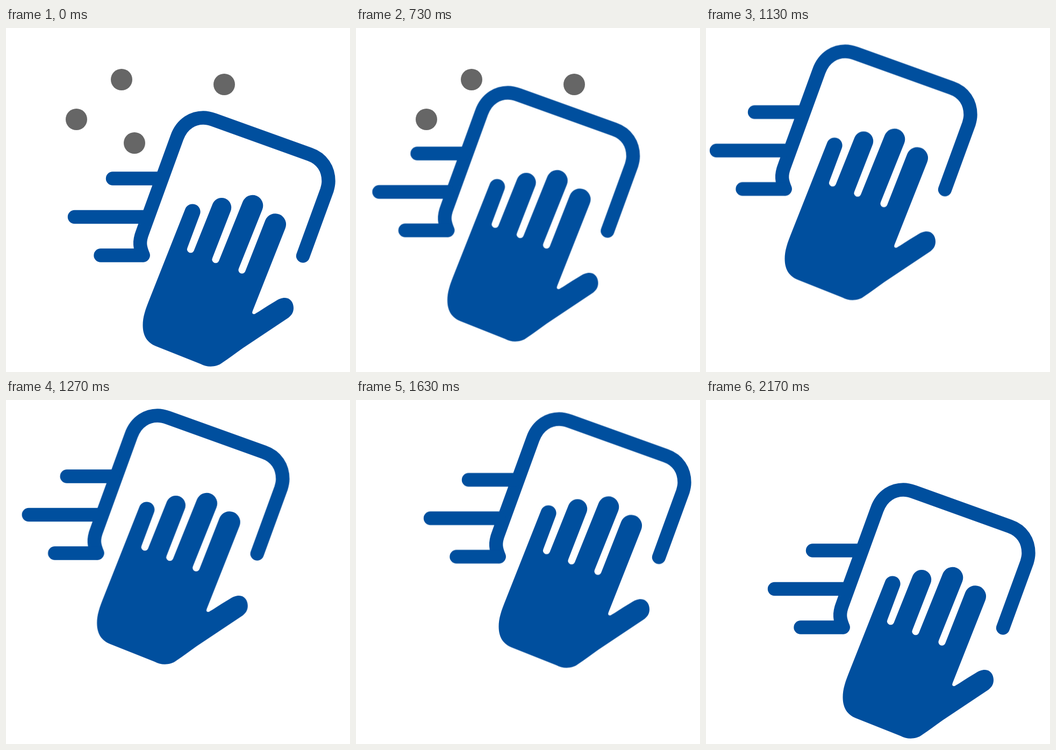
Recreate the animation shown at these times as an HTML page without scripts. Size 640 by 640 pixels, loop 3.61 s.

```html
<!DOCTYPE html>
<html lang="en">
<head>
<meta charset="utf-8">
<title>Wiping hand</title>
<style>
  html, body { margin: 0; width: 100%; height: 100%; overflow: hidden; background: #fff; }
  svg { display: block; width: 100%; height: 100%; }

  .dots { fill: #666; animation: vanish 3610ms step-end infinite; }
  .wiper { animation: wipe 3610ms steps(2, start) infinite; }
  .cloth { fill: #fff; stroke: #004f9e; stroke-width: 25.4; stroke-linecap: round; stroke-linejoin: round; }
  .hand { fill: #004f9e; }

  @keyframes vanish {
    0% { visibility: visible; }
    25.761%, 100% { visibility: hidden; }
  }

  /* One round of the wipe, advancing in steps of about 40 ms */
  @keyframes wipe {
    0% { transform: none; animation-timing-function: step-end; }
    11.911% { transform: translate(0, 0); animation-timing-function: steps(8, start); }
    21.329% { transform: translate(-84.5px, -46.5px); }
    23.545% { transform: translate(-100px, -60px); }
    25.761% { transform: translate(-109.5px, -75.5px); }
    27.977% { transform: translate(-113.5px, -92.5px); }
    30.193% { transform: translate(-113.5px, -109px); }
    32.409% { transform: translate(-108px, -123.5px); }
    34.349% { transform: translate(-95px, -134.5px); }
    36.565% { transform: translate(-75.5px, -141.5px); }
    38.504% { transform: translate(-52px, -144.2px); }
    40.72% { transform: translate(-28px, -144.6px); animation-timing-function: steps(1, start); }
    42.382% { transform: translate(-16px, -144.8px); animation-timing-function: steps(1, start); }
    43.49% { transform: translate(-5px, -142px); }
    45.429% { transform: translate(11px, -131.5px); }
    47.645% { transform: translate(19.2px, -115px); }
    49.723% { transform: translate(20.5px, -95.5px); }
    51.8% { transform: translate(16.7px, -74.5px); animation-timing-function: steps(1, start); }
    53.462% { transform: translate(14.5px, -64.5px); animation-timing-function: steps(4, start); }
    57.34% { transform: translate(7px, -28px); animation-timing-function: steps(3, start); }
    61.496%, 100% { transform: translate(0, 0); }
  }
</style>
</head>
<body>
<svg viewBox="0 0 640 640">
  <g class="dots">
    <circle cx="215" cy="96" r="20"/>
    <circle cx="131" cy="170" r="20"/>
    <circle cx="406" cy="105" r="20"/>
    <circle cx="239" cy="214" r="20"/>
  </g>
  <g class="wiper">
    <g class="cloth">
      <path d="M255 422.5C249 408 247 398 254 380L318 204C328 176 350 167 367 167
        C375 167 380 168.500 387 171L565 235C588 243 600 262 600 285
        C600 291 598.500 297 597 302L552.500 424"/>
      <path d="M198.500 280H285M127.500 351.500H255M176 423H255"/>
    </g>
    <path class="hand" d="M333.500 336.500A14.500 14.500 0 0 1 360.500 347.500
      L337.500 409A6.500 6.500 0 0 0 349.500 414.500
      L384.500 327A18 18 0 0 1 417.800 341
      L384 428A6.500 6.500 0 0 0 396 433.500
      L440.500 323A19.500 19.500 0 0 1 476.800 338
      L433 447.500A6.500 6.500 0 0 0 445 453
      L482.500 357.500A20 20 0 0 1 519.500 373
      L459 526C457 531 459 533 463 532C470 528 480 521 500 509
      C508 504 512 502 519 502C529 502 535 511 535 521C535 530 530 536 524 540
      L440 596C427 605 414 615 402 623C392 631 374 632 362 625
      L279 592C264 586 254.500 574 254.500 553C254.500 538 259 524 268 502Z"/>
  </g>
</svg>
</body>
</html>
```
